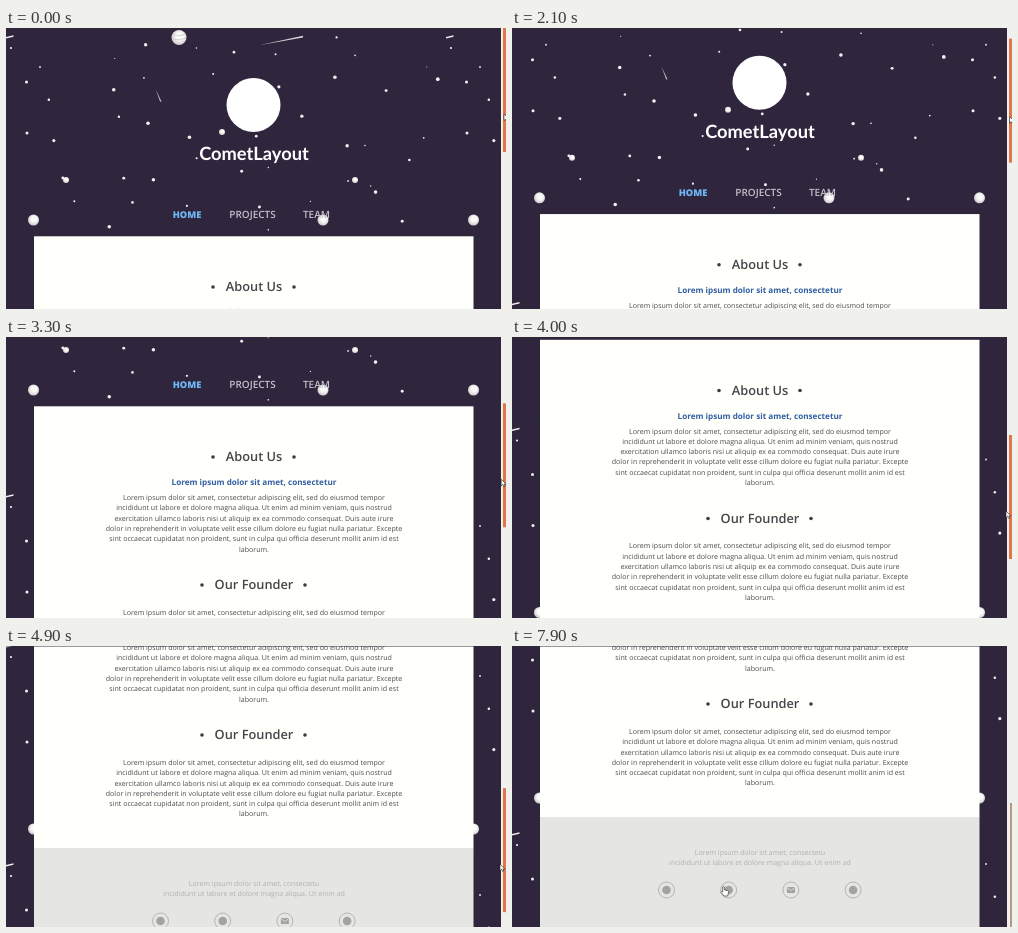
These frames come from a looping animation (500x281 px, 8000 ms). An HTML page:

```html
<!DOCTYPE html>
<html lang="en">
<head>
<meta charset="utf-8">
<title>Scrolling page</title>
<style>
html, body { margin: 0; width: 100%; height: 100%; overflow: hidden; background: #2f263e; }
svg { display: block; width: 500px; height: 281px; text-rendering: geometricPrecision; }
text { font-family: "Open Sans", sans-serif; text-anchor: middle; }
.body { font-size: 7.05px; fill: #4b4b50; }
.foot { font-size: 7.05px; fill: #b0b1ad; }
.head { font-size: 12.8px; font-weight: 600; fill: #45454a; }
.sub { font-size: 8.15px; font-weight: 700; fill: #315fa3; }
.nav { font-size: 10px; font-weight: 600; fill: #c3bfca; }
.home { font-size: 9.3px; font-weight: 800; fill: #70b8f5; }
.brand { font: 700 18.3px Lato, sans-serif; fill: #fff; }
</style>
</head>
<body>
<svg viewBox="0 0 500 281">
  <defs>
    <radialGradient id="moon" cx=".55" cy=".42" r=".65">
      <stop offset=".35" stop-color="#fbfaf8"/><stop offset="1" stop-color="#c4c0c4"/>
    </radialGradient>
    <g id="sky"></g>
  </defs>
  <g id="page"></g>
  <rect width="500" height=".8" fill="#2c2833" opacity=".6"/>
  <rect x="495" width="5" height="281" fill="#f1f0ef"/>
  <rect id="thumb" height="124"/>
  <g id="cursor" stroke="#222" stroke-width=".6" fill="#fff">
    <path id="arrow" d="M0 0V6.6L1.6 5.2 2.7 7.5 3.8 7 2.8 4.8H4.8Z"/>
    <path id="hand" d="M0 0Q1-1 1.7 0V3L5 3.6Q6 4 5.8 5.5L5 9H1.2L-1.8 5.2Q-1.6 4 0 5Z"/>
  </g>
</svg>
<script>
const $ = id => document.getElementById(id);
const text = (cls, x, y, s) => `<text class="${cls}" x="${x}" y="${y}">${s}</text>`;
const circle = (x, y, r, attrs) => `<circle cx="${x}" cy="${y}" r="${r}" ${attrs}/>`;
const rect = (x, y, w, h, fill) => `<rect x="${x}" y="${y}" width="${w}" height="${h}" fill="${fill}"/>`;

let seed = 7;
const random = () => (seed = seed * 16807 % 2147483647) / 2147483647;

function drawSky() {
  const star = (x, y, r) => circle(x, y, r, `fill="${r > 2 ? 'url(#moon)' : '#f3f0f2'}"`);
  const landmarks = [[173, 9.5, 7.5], [27.5, 192, 5.5], [317, 192, 5.5], [60, 152, 3],
    [349, 152, 3], [216, 104, 3], [20.5, 54, 1.5], [21, 105, 1.5], [5, 20, 1.1]];
  let out = landmarks.map(s => star(...s)).join('');
  // One small star per cell of a loose grid
  for (let x = 34; x < 430; x += 45)
    for (let y = 4; y < 200; y += 40)
      out += star(x + random() * 42, y + random() * 38, .5 + random() * 1.4);
  return out + `<path d="M253 17.2L297 7.8 297 9.4Z" fill="#d8d4d8"/>
    <path d="M0 8.9L7.5 7.2V8.8L0 10.4Z" fill="#f3f0f2"/>
    <path d="M149.5 61L155.5 73.5 154.2 73.8Z" fill="#c9c5cc"/>
    <path d="M167 7Q173 9 180 6M166.5 11Q173 13 180 10" fill="none" stroke="#c4bfc4" stroke-width=".7"/>`;
}
$('sky').innerHTML = drawSky();

const lorem = [
  'Lorem ipsum dolor sit amet, consectetur adipiscing elit, sed do eiusmod tempor',
  'incididunt ut labore et dolore magna aliqua. Ut enim ad minim veniam, quis nostrud',
  'exercitation ullamco laboris nisi ut aliquip ex ea commodo consequat. Duis aute irure',
  'dolor in reprehenderit in voluptate velit esse cillum dolore eu fugiat nulla pariatur. Excepte',
  'sint occaecat cupidatat non proident, sunt in culpa qui officia deserunt mollit anim id est',
  'laborum.'
];
const lines = (cls, y, list) => list.map((s, i) => text(cls, 248, y + i * 10.3, s)).join('');
const heading = (s, y, gap) => text('head', 248, y + 4, s) +
  [-gap, gap].map(d => circle(247.5 + d, y, 1.8, 'fill="#3a3a40"')).join('');

const iconX = i => 154.5 + i * 62.2;
const iconY = 573;
function button(i) {
  const x = iconX(i);
  const mail = rect(x - 4, iconY - 3, 8, 6, '#a3a4a1') +
    `<path d="M${x - 4} ${iconY - 2.5}l4 3 4-3" fill="none" stroke="#e5e6e1" stroke-width=".8"/>`;
  return circle(x, iconY, 8, 'fill="none" stroke="#a9aaa7" stroke-width=".8"') +
    (i === 2 ? mail : circle(x, iconY, 4.3, 'fill="#a3a4a1"'));
}

// Each page section repeats the sky from its own top edge
const sections = [0, 289, 508].map(y => rect(0, y, 500, 330, '#2f263e') +
  [0, 440].map(x => `<use href="#sky" x="${x}" y="${y}"/>`).join(''));

$('page').innerHTML = sections.join('') +
  circle(247.5, 77, 27, 'fill="#fff"') +
  text('brand', 248, 132, 'CometLayout') +
  text('nav home', 181, 189.8, 'HOME') +
  text('nav', 246.5, 189.8, 'PROJECTS') +
  text('nav', 310.5, 189.8, 'TEAM') +
  rect(28, 208.3, 439.5, 292, '#fffffc') +
  rect(28, 500, 439.5, 120, '#e5e6e1') +
  heading('About Us', 259, 40.5) +
  text('sub', 248, 287, 'Lorem ipsum dolor sit amet, consectetur') +
  lines('body', 302, lorem) +
  heading('Our Founder', 387, 51.5) +
  lines('body', 416.9, lorem) +
  lines('foot', 538, ['Lorem ipsum dolor sit amet, consectetu',
    'incididunt ut labore et dolore magna aliqua. Ut enim ad']) +
  [0, 1, 2, 3].map(button).join('');

const clamp = v => Math.min(1, Math.max(0, v));
const dragEnd = 5400;
const scrollKeys = [[1700, 0], [2600, 50], [3300, 139], [4000, 205.5], [4900, 298], [dragEnd, 329]];
// The pointer leaves the scrollbar and visits the buttons
const pointerKeys = [[dragEnd, 495], [6300, iconX(0) + 13], [7100, iconX(3)], [7800, iconX(1) - 6]];

// Adds up the clamped steps between [time, value] keys
const follow = (keys, t) => keys.reduce((sum, [time, value], i) => {
  if (!i) return value;
  const [t0, v0] = keys[i - 1];
  return sum + (value - v0) * clamp((t - t0) / (time - t0));
}, 0);

function draw(now) {
  const t = Math.floor(now % 8000 / 100) * 100;
  const scroll = follow(scrollKeys, t);
  const top = scroll * .477;
  const dragging = t <= dragEnd;
  const x = dragging ? 498 - Math.min(4, scroll / 50) : follow(pointerKeys, t);
  const y = dragging ? 76 + top + 10 * clamp(1 - t / 2600) : 233 + 8 * clamp((t - dragEnd) / 900);
  const overIcon = [0, 1, 2, 3].some(i => Math.hypot(iconX(i) - x, iconY - scroll - y) < 8);

  $('page').setAttribute('transform', `translate(0 ${-scroll})`);
  const thumb = $('thumb');
  thumb.setAttribute('y', top);
  thumb.setAttribute('x', dragging ? 497 : 498);
  thumb.setAttribute('width', dragging ? 3 : 2);
  thumb.setAttribute('fill', dragging ? '#de7846' : '#b59a80');
  $('cursor').setAttribute('transform', `translate(${x} ${y})`);
  $('arrow').style.display = overIcon ? 'none' : '';
  $('hand').style.display = overIcon ? '' : 'none';
  requestAnimationFrame(draw);
}
draw(performance.now());
</script>
</body>
</html>
```
